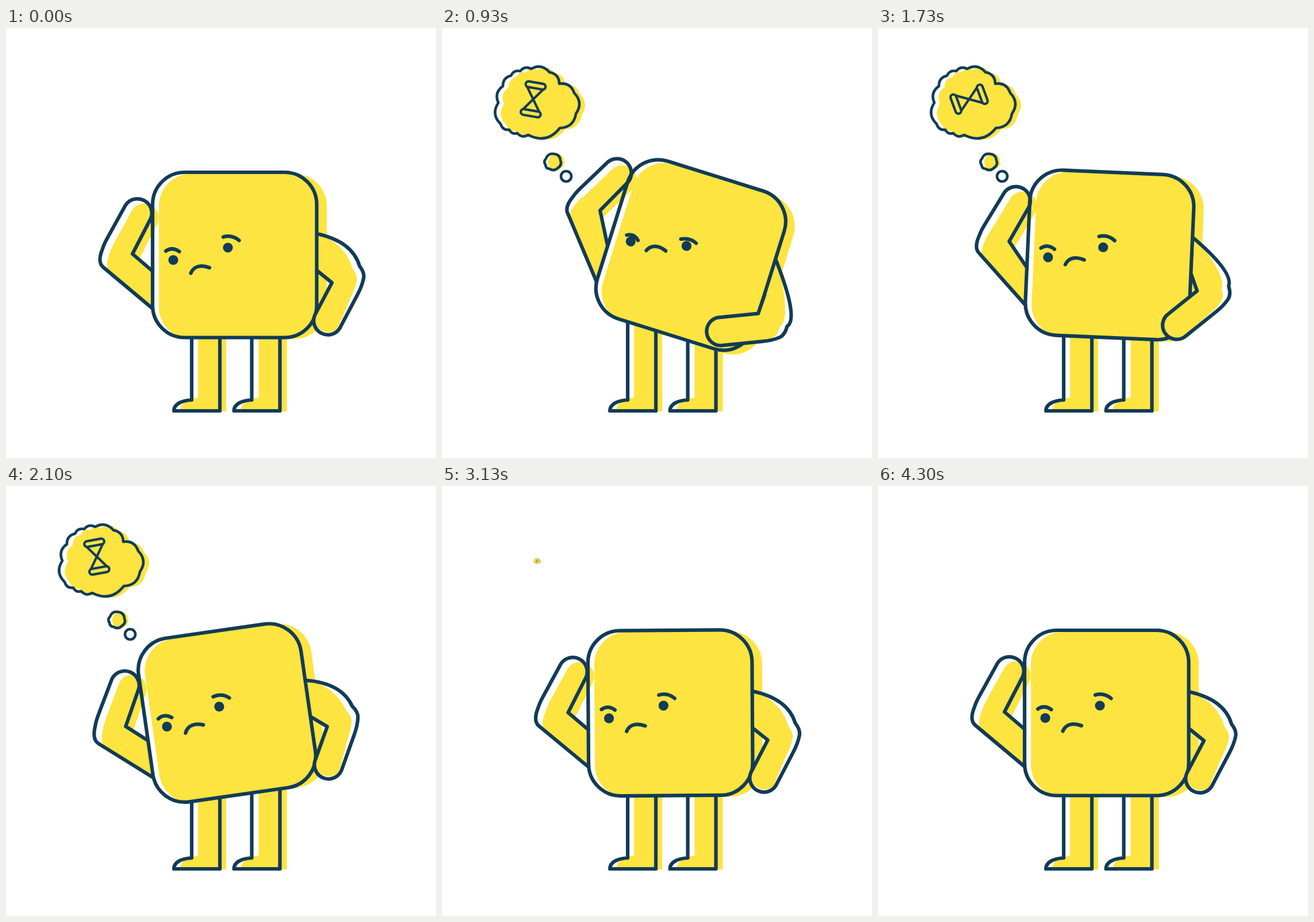
Write an HTML page that moves like this. It is 748 px wide and 748 px high and loops after 5360 ms.

```html
<!DOCTYPE html>
<html lang="en">
<head>
<meta charset="utf-8">
<title>Thinking square</title>
<style>
  html, body { margin: 0; width: 100%; height: 100%; overflow: hidden; background: #fff; }
  svg { display: block; width: 100vw; height: 100vh; }
  .fill { fill: #fde440; }
  .line { fill: none; stroke: #123b57; stroke-width: 6.2; stroke-linecap: round; stroke-linejoin: round; }
  .eye { fill: #123b57; }
  .thin { stroke-width: 4.6; }
  .glass { stroke-width: 4.2; }
</style>
</head>
<body>
<svg viewBox="0 0 748 748">
  <defs>
    <path id="leg" d="M323 490V647C304 648 292 655 292 666H372V490"/>
    <path id="legFill" d="M334 490V643C314 645 303 654 303 667H383V490Z"/>
    <path id="cloud"/>
    <path id="puff"/>
  </defs>
  <use href="#legFill" class="fill"/>
  <use href="#legFill" class="fill" x="105.5"/>
  <use href="#leg" class="line"/>
  <use href="#leg" class="line" x="104.5"/>
  <g id="body">
    <path id="leftFill" class="fill"/>
    <rect class="fill" x="266" y="253.5" width="292" height="287.5" rx="56"/>
    <path id="leftLine" class="line"/>
    <rect class="line" x="255" y="251" width="285.5" height="287.5" rx="56"/>
    <circle class="eye" cx="291" cy="403.5" r="8.6"/>
    <circle class="eye" cx="386" cy="382" r="8.6"/>
    <path id="browL" class="line"/>
    <path id="browR" class="line"/>
    <path id="mouth" class="line" d="M321.5 426.5C327 413 341 412 354 417"/>
    <path id="rightFill" class="fill"/>
    <path id="rightLine" class="line"/>
  </g>
  <circle id="dot" class="line thin" cx="216" cy="258" r="9"/>
  <g id="small">
    <use href="#puff" class="fill" x="6"/>
    <use href="#puff" class="line thin"/>
  </g>
  <g id="bubble">
    <use href="#cloud" class="fill" x="10" y="2"/>
    <use href="#cloud" class="line thin"/>
    <g id="glass" class="line glass">
      <rect x="-17.5" y="-29.5" width="35" height="10" rx="5"/>
      <rect x="-17.5" y="19.5" width="35" height="10" rx="5"/>
      <path d="M-14 -19.5L14 19.5M14 -19.5L-14 19.5"/>
    </g>
  </g>
</svg>
<script>
const LOOP = 5360;
const $ = id => document.getElementById(id);
const set = (id, name, value) => $(id).setAttribute(name, value);

const lerp = (a, b, p) => a + (b - a) * p;
const ramp = (t, from, to) => Math.min(1, Math.max(0, (t - from) / (to - from)));
const ease = (t, from, to) => (1 - Math.cos(Math.PI * ramp(t, from, to))) / 2;
const arch = (t, from, to) => Math.sin(Math.PI * ramp(t, from, to));

// Closed outline with a bump pushed outward between each two notches
function scallop(text) {
  const pts = text.split(' ').map(p => p.split(',').map(Number));
  return pts.reduce((d, [x, y], i) => {
    const [nx, ny] = pts[(i + 1) % pts.length];
    const cx = (x + nx) / 2 + 0.41 * (ny - y), cy = (y + ny) / 2 - 0.41 * (nx - x);
    return `${d}Q${cx} ${cy} ${nx} ${ny}`;
  }, `M${pts[0]}`) + 'Z';
}
set('cloud', 'd', scallop('98,130 106,101 120,83 136,75 155,71 187,77 204,97 230,113 233,149 205,174 150,186 131,183 117,177 102,167'));
set('puff', 'd', scallop('181,227 195,219 206,230 202,243 187,245 180,238'));

// inset is 1 for the offset colour, 0 for the outline
function leftArm(raise, inset) {
  const at = (x, y, dx, dy) => `${x + 4 * raise + dx * inset} ${y - 25 * raise + dy * inset} `;
  const elbow = (x, y) => at(x, y, 12 - 4 * raise, 9 + 2 * raise);
  const hand = (x, y) => at(x, y, 12, 8);
  return `M255 488L${elbow(169, 416)}C${elbow(161, 409)}${elbow(163, 396)}${elbow(168, 384)}`
    + `Q${elbow(170, 377)}${hand(176, 366)}L${hand(208, 308)}A25 25 0 0 1 ${hand(252, 331)}`
    + `L${elbow(220, 393)}L255 423`;
}

function rightArm(swing, inset) {
  const x = lerp(567, 540, swing), y = lerp(443, 457, swing);
  const a = lerp(117.8, 157, swing) * Math.PI / 180;
  const c = Math.cos(a), s = Math.sin(a);
  const reach = 64 + 6 * swing, edge = 541 + 3 * inset;
  // Forearm frame: u runs to the hand, v to the outer side
  const at = (u, v, k = inset) =>
    `${x + u * c + v * s - 12 * k} ${y + u * s - v * c + 5 * k} `;
  const bend = at(-24 - 12 * (1 + swing), 14 + 3 * swing);
  return `M${edge} 358Q${swing > 0.5 ? at(-70, 12 + 4 * swing) : bend.replace(bend, at(-80, -2))}${at(-48, 29 - 2 * swing)}`
    + `C${at(-44, 38)}${at(-39, 43)}${at(-33, 45)}`
    + `Q${at(-20, 49)}${at(-3, 49)}L${at(reach, 49, 0.4 * inset)}A24.6 24.6 0 0 1 ${at(reach, 0, 0)}`
    + `L${at(0, 0, 0)}L${edge} 422`;
}

function grow(id, k, x, y) {
  set(id, 'transform', `translate(${x} ${y}) scale(${k}) translate(${-x} ${-y})`);
  set(id, 'visibility', k > 0.001 ? 'visible' : 'hidden');
}

function draw(t) {
  // Lean right, tip over to the left, settle upright
  const rise = 1 - (1 - ramp(t, 0, 1180)) ** 1.75;
  const angle = 18.6 * rise - 27 * ease(t, 1180, 2160) + 8.4 * ease(t, 2160, 3280);
  const shift = angle * (angle > 0 ? 2.02 : 1.64);
  set('body', 'transform', `translate(${shift} 0) rotate(${angle} 397.5 394.7)`);

  const raise = ease(t, 0, 400) - ease(t, 1430, 2080);
  const swing = ease(t, 0, 560) - ease(t, 1400, 2090);
  set('leftFill', 'd', leftArm(raise, 1) + 'Z');
  set('leftLine', 'd', leftArm(raise, 0));
  set('rightFill', 'd', rightArm(swing, 1) + 'Z');
  set('rightLine', 'd', rightArm(swing, 0));

  const f = ease(t, 0, 450) - ease(t, 1200, 1680);
  set('browL', 'd', `M${278 + 3 * f} ${388 + 7 * f}Q${289 + 4 * f} ${380 + 8 * f} ${301.5 + f} ${389 + 9 * f}`);
  set('browR', 'd', `M${378 - 5 * f} ${363.5 + 10 * f}Q${393 - 5 * f} ${359 + 7 * f} ${405.5 - 5 * f} ${369.5 + 3 * f}`);
  set('mouth', 'transform', `translate(0 ${16 * (ease(t, 1000, 3100) - ease(t, 0, 900))})`);

  grow('dot', ease(t, 130, 270) - ease(t, 2960, 3060), 216, 258);
  grow('small', ease(t, 230, 380) - ease(t, 2960, 3090), 192, 232);
  grow('bubble', ease(t, 380, 530) + 0.04 * arch(t, 530, 700) - ease(t, 2950, 3170), 165.5, 130.5);

  // The hourglass turns over twice, hopping a little each time
  const turn = -142 + 180 * (ease(t, 240, 1170) + ease(t, 1460, 2440));
  const hop = arch(t, 240, 1170) + arch(t, 1460, 2440);
  set('glass', 'transform', `translate(${161.5 - 4 * hop} ${129.5 - 7.5 * hop}) rotate(${turn})`);
}

// Pictures hold for 30 ms and 70 ms in turn
const snap = t => Math.floor(t / 100) * 100 + (t % 100 >= 30 ? 30 : 0);

const start = performance.now();
function tick() {
  draw(snap((performance.now() - start) % LOOP));
  requestAnimationFrame(tick);
}
tick();
</script>
</body>
</html>
```
